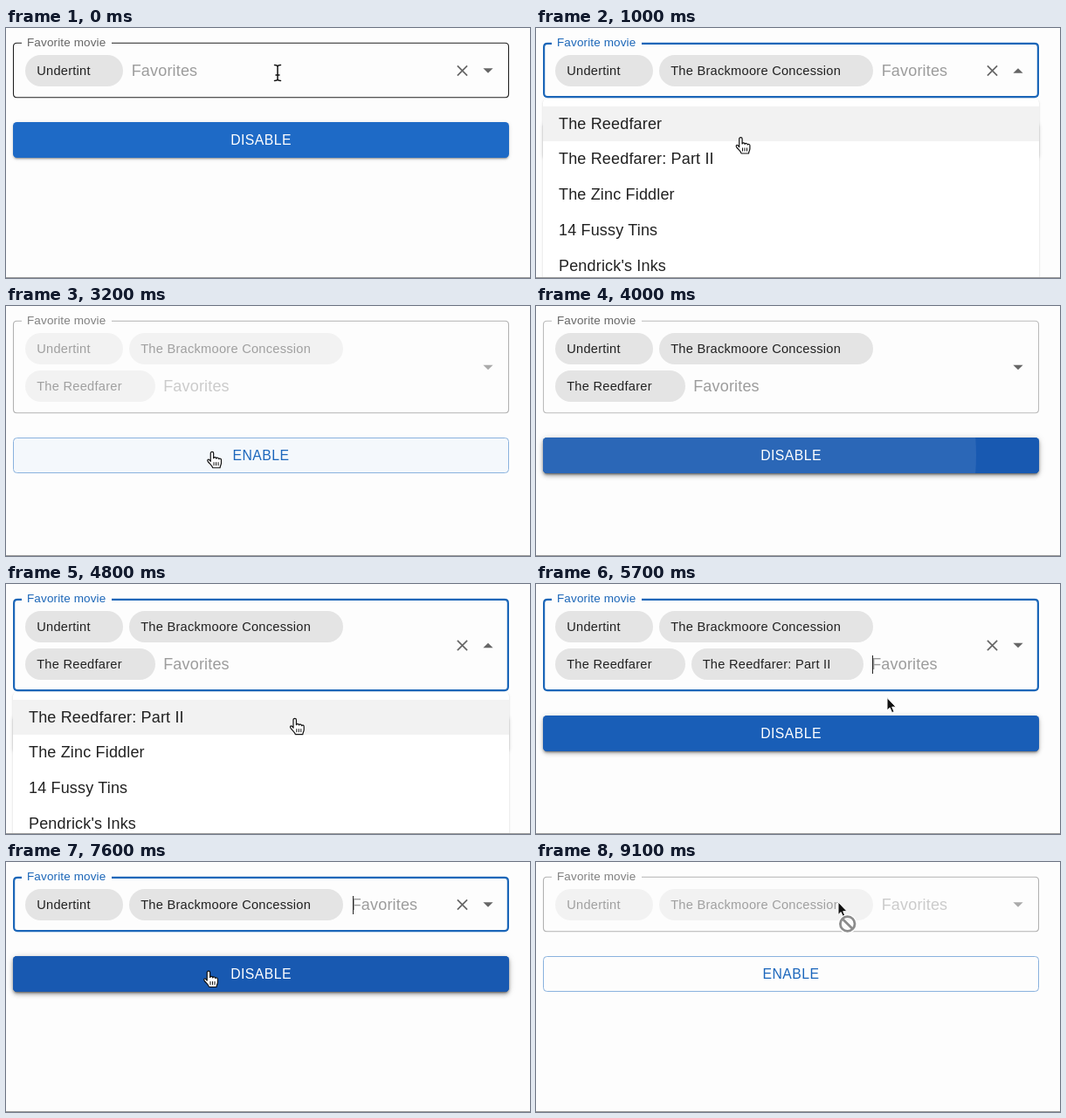
Recreate the animation shown at these times as an HTML page. Size 600 by 287 pixels, loop 9.2 s.

```html
<!DOCTYPE html>
<html lang="en">
<head>
<meta charset="utf-8">
<title>Tag picker</title>
<style>
html, body { margin: 0; width: 100%; height: 100%; overflow: hidden; background: #fdfdfd; }
body { position: relative; font: 18px "Liberation Sans", Arial, sans-serif; letter-spacing: .169px; color: #212121; }
body * { position: absolute; box-sizing: border-box; white-space: pre; }
svg { left: 0; top: 0; overflow: visible; }
svg * { position: static; }
#label { left: 24px; top: 7px; line-height: 20px; font-size: 13.5px; letter-spacing: .127px; }
.chip { height: 36px; border-radius: 18px; background: #e4e4e4; font-size: 14.625px; line-height: 36px; letter-spacing: .26px; }
.chip span { left: 13.2px; }
.chip svg { left: auto; right: 18.2px; top: 18px; width: 0; height: 0; }
.chip path { stroke: #e4e4e4; stroke-width: 1.9; }
#hint { line-height: 36px; }
#caret { width: 1px; height: 21px; background: #222; }
#btn { left: 8px; width: 568px; height: 41.2px; border-radius: 4.5px; text-align: center;
  font-size: 15.75px; line-height: 41.2px; letter-spacing: .45px; color: #fff; background: #1e6ac6;
  box-shadow: 0 3px 1px -2px #0003, 0 2px 2px #00000024, 0 1px 5px #0000001f; }
#btn::before { content: ""; position: absolute; inset: 0; border-radius: inherit; opacity: var(--hover);
  background: #1859b1; box-shadow: 0 2px 4px -1px #0003, 0 4px 5px #00000024, 0 1px 10px #0000001f; }
#btn.off { color: #1b66bc; background: none; border: 1px solid #8ab2de; line-height: 39.2px; box-shadow: none; }
#btn.off::before { background: #1976d20a; box-shadow: none; }
#clip { inset: 0; overflow: hidden; border-radius: inherit; }
#ripple { border-radius: 50%; background: currentColor; }
#word { left: 0; right: 0; top: 0; }
#menu { left: 8px; width: 568px; height: 300px; background: #fff; border-radius: 4.5px;
  box-shadow: 0 2px 1px -1px #0003, 0 1px 1px #00000024, 0 1px 3px #0000001f; }
.row { left: 0; width: 568px; height: 40.9px; padding-left: 18px; line-height: 40.9px; }
#rule { left: 0; top: 286px; width: 100%; height: 1px; background: #999; }
</style>
</head>
<body>
<svg width="600" height="287">
  <path id="edge" fill="none"/>
  <path id="clear" d="M-5.6-5.6 5.6 5.6M5.6-5.6-5.6 5.6" stroke="#666" stroke-width="1.7"/>
  <path id="arrow" d="M-5.6-2.8H5.6L0 2.8Z"/>
</svg>
<div id="label">Favorite movie</div>
<div id="chips"></div>
<div id="hint">Favorites</div>
<div id="caret"></div>
<div id="btn"><div id="clip"><div id="ripple"></div></div><div id="word"></div></div>
<div id="menu"></div>
<div id="rule"></div>
<svg width="600" height="287">
  <g id="pointer">
    <g id="text" fill="none" stroke-linecap="round">
      <path id="beam" d="M-3.5-9Q0-9 0-7Q0-9 3.5-9M0-7V7M-3.5 9Q0 9 0 7Q0 9 3.5 9M-2 2.5H2" stroke="#fff" stroke-width="3.4"/>
      <use href="#beam"/>
      <path d="M-3.5-9Q0-9 0-7Q0-9 3.5-9M0-7V7M-3.5 9Q0 9 0 7Q0 9 3.5 9M-2 2.5H2" stroke="#111" stroke-width="1.5"/>
    </g>
    <g id="hand" fill="#fff" stroke="#111" stroke-width="1.2" stroke-linejoin="round">
      <path d="M-1.8 10.5V1.3a1.7 1.7 0 0 1 3.4 0V7a1.6 1.6 0 0 1 3.1.3 1.6 1.6 0 0 1 3 .7 1.5 1.5 0 0 1 2.7 1.1V12.5c0 2-1.2 3-1.4 5.5H.6C.2 15.8-3 13.3-4.8 10.8-6.2 8.8-4.4 7.6-3.2 8.8Z"/>
      <path d="M2 11.5v4M4.5 11.5v4M7 11.5v4" stroke-width="1"/>
    </g>
    <g id="tip">
      <path d="M0 0V14.5L3.2 11.6 5.6 17.2 8.1 16.1 5.7 10.7H10.2Z" fill="#111" stroke="#fff" stroke-width="1"/>
      <g id="deny" transform="translate(10.7 25)" fill="none">
        <path id="ban" d="M-8.3 0a8.3 8.3 0 1 1 16.6 0a8.3 8.3 0 1 1-16.6 0M-5.8-5.8 5.8 5.8" stroke="#fff" stroke-width="5"/>
        <path d="M-8.3 0a8.3 8.3 0 1 1 16.6 0a8.3 8.3 0 1 1-16.6 0M-5.8-5.8 5.8 5.8" stroke="#8c8c8c" stroke-width="2.8"/>
      </g>
    </g>
  </g>
</svg>
<script>
const LOOP = 9200, STEP = 100, ROW = 40.9;
const $ = id => document.getElementById(id);

const movies = ["Undertint", "The Brackmoore Concession", "The Reedfarer", "The Reedfarer: Part II",
  "The Zinc Fiddler", "14 Fussy Tins", "Pendrick's Inks"];
const chipWidth = [112, 245, 148.5, 197];

// Clicks and what they change; focus holds the time it began.
const events = [
  [0, { chips: [0], focus: 0, open: false, off: false }],
  [200, { focus: 200, open: true }],
  [500, { chips: [0, 1], open: false }],
  [700, { open: true }],
  [1200, { chips: [0, 1, 2], open: false }],
  [1600, { off: true, focus: 0 }],
  [3600, { off: false }],
  [4300, { focus: 4300, open: true }],
  [5100, { chips: [0, 1, 2, 3], open: false }],
  [6500, { focus: 0 }],
  [6600, { focus: 6600, chips: [0, 1, 3] }],
  [7200, { chips: [0, 1] }],
  [7700, { off: true, focus: 0 }]
];
const presses = [1600, 3600, 7700];

// Pointer path: time, x, y
const path = [
  [0, 311, 51.5], [200, 311, 52], [400, 240, 112], [500, 240, 112], [700, 300, 60],
  [1000, 234.5, 126], [1200, 234.5, 126], [1500, 230, 168], [1700, 232, 166],
  [2100, 135.5, 98], [2300, 235, 60], [2600, 545, 75], [2900, 240, 165], [3600, 230, 172],
  [3900, 230, 172], [4200, 250, 140], [4300, 300, 98], [4700, 330, 155], [5100, 335, 153],
  [5600, 401, 153], [5700, 402, 130.5], [6100, 152, 93], [6600, 152, 92], [7000, 198.5, 91.5],
  [7200, 198.5, 92], [7500, 232, 125], [7700, 232, 126], [8000, 250, 118], [8400, 432, 62],
  [8700, 428, 58], [9000, 346, 46], [LOOP, 346, 46]
];

function pointerAt(t) {
  const i = path.findIndex(k => k[0] > t);
  const [t0, x0, y0] = path[i - 1], [t1, x1, y1] = path[i];
  const u = (t - t0) / (t1 - t0), e = u * u * (3 - 2 * u);
  return { x: x0 + (x1 - x0) * e, y: y0 + (y1 - y0) * e };
}

function layout(ids) {
  let x = 22, y = 31;
  const spots = ids.map(id => {
    const w = chipWidth[id];
    if (x + w > 480) { x = 22; y += 43; }
    const spot = { id, x, y, w };
    x += w + 7;
    return spot;
  });
  return { spots, endX: x - 7, endY: y, shift: y - 31 };
}

function sceneAt(t) {
  const s = Object.assign({}, ...events.filter(e => e[0] <= t).map(e => e[1]));
  Object.assign(s, layout(s.chips), pointerAt(t));
  const inX = s.x > 8 && s.x < 576, top = 108 + s.shift;
  s.menuTop = 80.5 + s.shift;
  s.row = s.open && inX && s.y > s.menuTop + 9 ? Math.floor((s.y - s.menuTop - 9) / ROW) : -1;
  s.onField = inX && s.y > 17 && s.y < 80 + s.shift;
  s.onBtn = !s.open && inX && s.y > top && s.y < top + 41;
  s.onX = s.off ? -1 : s.spots.findIndex(c => Math.hypot(s.x - c.x - c.w + 18, s.y - c.y - 18) < 11);
  const inText = s.onField && s.x > s.endX && s.x < 505 && s.y > s.endY;
  s.kind = s.row >= 0 || s.onBtn || s.onX >= 0 ? "hand"
    : s.onField && s.off ? "deny" : inText ? "text" : "tip";
  return s;
}

const show = (el, on) => { el.style.display = on ? "" : "none"; };
const place = (el, x, y) => { el.style.left = x + "px"; el.style.top = y + "px"; };
const add = (parent, cls, html) => {
  const el = document.createElement("div");
  el.className = cls;
  el.innerHTML = html;
  return $(parent).appendChild(el);
};

const chips = chipWidth.map((w, i) => {
  const el = add("chips", "chip", `<span>${movies[i]}</span>
    <svg><circle r="10.3"/><path d="M-4-4 4 4M4-4-4 4"/></svg>`);
  el.style.width = w + "px";
  return el;
});
const rows = movies.map(m => add("menu", "row", m));

function drawField(s, t) {
  const focus = s.focus > 0, inset = focus ? 1.1 : .5;
  const l = 8 + inset, r = 576 - inset, top = 16.8 + inset, b = 80.2 + s.shift - inset, q = 4;
  const edge = $("edge");
  edge.setAttribute("d", `M18 ${top}H${l + q}Q${l} ${top} ${l} ${top + q}V${b - q}Q${l} ${b} ${l + q} ${b}` +
    `H${r - q}Q${r} ${b} ${r} ${b - q}V${top + q}Q${r} ${top} ${r - q} ${top}H121`);
  edge.setAttribute("stroke", focus ? "#1b66b8" : s.off ? "#b2b2b2" : s.onField ? "#212121" : "#bcbcbc");
  edge.setAttribute("stroke-width", focus ? 2.2 : 1.1);
  $("label").style.color = focus ? "#1b66b8" : s.off ? "#808080" : "#666";

  $("chips").style.opacity = s.off ? .42 : 1;
  chips.forEach((el, id) => {
    const i = s.chips.indexOf(id);
    show(el, i >= 0);
    if (i < 0) return;
    place(el, s.spots[i].x, s.spots[i].y);
    el.querySelector("circle").setAttribute("fill", i === s.onX ? "#7c7c7c" : "#a0a0a0");
  });

  place($("hint"), s.endX + 9.7, s.endY);
  $("hint").style.color = s.off ? "#cbcbcb" : "#9c9c9c";
  place($("caret"), s.endX + 10.5, s.endY + 7.5);
  show($("caret"), focus && (t - s.focus) % 1000 < 500);

  const mid = 49 + s.shift / 2;
  $("clear").setAttribute("transform", `translate(522.5 ${mid})`);
  show($("clear"), !s.off && (focus || s.onField));
  $("arrow").setAttribute("transform", `translate(552 ${mid}) rotate(${s.open ? 180 : 0})`);
  $("arrow").setAttribute("fill", s.off ? "#aaa" : "#666");
}

function drawButton(s, t) {
  const btn = $("btn");
  btn.className = s.off ? "off" : "";
  btn.style.top = 108 + s.shift + "px";
  $("word").textContent = s.off ? "ENABLE" : "DISABLE";
  const recent = [0, 1, 2].filter(k => sceneAt(Math.max(0, t - k * STEP)).onBtn);
  btn.style.setProperty("--hover", recent.length / 3);

  const start = presses.find(p => t >= p && t < p + 550);
  show($("ripple"), start !== undefined);
  if (start === undefined) return;
  const age = t - start, r = age * .685, c = pointerAt(start);
  const el = $("ripple");
  place(el, c.x - 8 - r, 20 - r);
  el.style.width = el.style.height = 2 * r + "px";
  el.style.opacity = .3 * (1 - age / 550);
}

function drawMenu(s) {
  show($("menu"), s.open);
  $("menu").style.top = s.menuTop + "px";
  let n = 0;
  rows.forEach((el, id) => {
    const free = !s.chips.includes(id);
    show(el, free);
    if (!free) return;
    el.style.top = 9 + n * ROW + "px";
    el.style.background = n === s.row ? "#f2f2f2" : "none";
    n++;
  });
}

function drawPointer(s, t) {
  $("pointer").setAttribute("transform", `translate(${s.x} ${s.y})`);
  show($("pointer"), t < 3900 || t > 4000);
  show($("text"), s.kind === "text");
  show($("hand"), s.kind === "hand");
  show($("tip"), s.kind === "tip" || s.kind === "deny");
  show($("deny"), s.kind === "deny");
}

function frame() {
  const t = Math.floor(performance.now() % LOOP / STEP) * STEP;
  const s = sceneAt(t);
  drawField(s, t);
  drawButton(s, t);
  drawMenu(s);
  drawPointer(s, t);
  requestAnimationFrame(frame);
}
frame();
</script>
</body>
</html>
```
